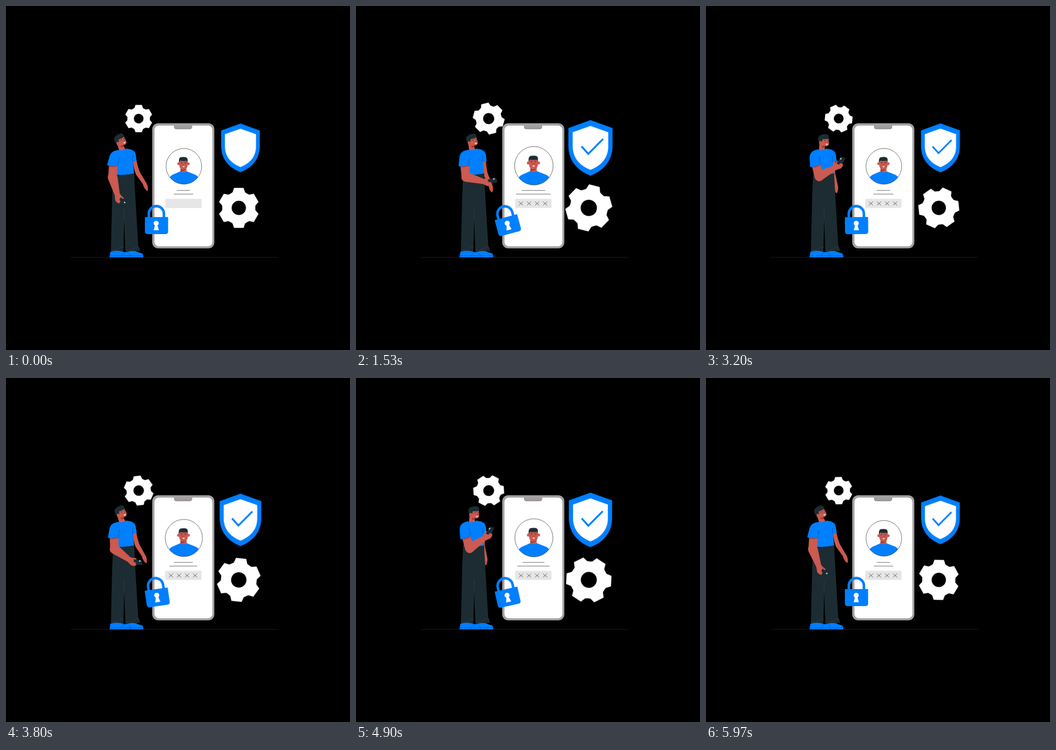
Write an HTML page without scripts that moves like this. It is 748 by 748 pixels and loops after 6010 ms.

```html
<!DOCTYPE html>
<html lang="en">
<head>
<meta charset="utf-8">
<title>Secure login</title>
<style>
  html, body { margin: 0; width: 100%; height: 100%; overflow: hidden; background: #000; }
  svg { display: block; width: 100vw; height: 100vh; }

  :root {
    --loop: 6010ms;
    --beat: calc(var(--loop) / 4);
    --step: calc(var(--loop) / 6);
    --sine: cubic-bezier(.37, 0, .63, 1);
    --in: cubic-bezier(.42, 0, .75, .57);
    --out: cubic-bezier(.25, .49, .6, 1);
  }

  .blue { fill: #007fff; }
  .skin { fill: #cb5a50; }
  .shade { fill: #a53d3a; }
  .dark { fill: #1c2c32; }
  .white { fill: #fff; }
  .fold { fill: none; stroke: #0a4a90; stroke-width: .8; stroke-linecap: round; }
  .seam { fill: none; stroke: #3d4b50; stroke-width: .6; }
  .ink { fill: none; stroke: #1c2c32; stroke-width: .9; stroke-linecap: round; }

  /* slow pulse */
  .pulse, .swing, .avatar, .stretch { animation: pulse var(--beat) var(--sine) infinite alternate; }
  .swing { animation-name: swing; transform-origin: 327px 464px; }
  .avatar { animation-name: grow; transform-origin: 386.5px 365px; }
  .stretch { animation-name: stretch; }
  @keyframes pulse { to { transform: scale(1.143); } }
  @keyframes swing { to { transform: rotate(-15deg); } }
  @keyframes grow { to { transform: scale(1.08); } }
  @keyframes stretch { to { transform: scaleX(1.8); } }

  .spin { animation: spin var(--loop) linear infinite; }
  .back { animation-direction: reverse; }
  @keyframes spin { to { transform: rotate(180deg); } }

  /* figure */
  .head, .far { animation: nod var(--step) var(--sine) infinite alternate; }
  .head { transform-origin: 251px 312px; }
  .far { animation-name: far; transform-origin: 279px 330px; }
  @keyframes nod { from { transform: rotate(-22deg); } to { transform: rotate(2deg); } }
  @keyframes far { to { transform: rotate(20deg); } }

  .upper, .fore { animation: upper var(--step) linear infinite alternate; }
  .upper { transform-origin: 236px 328px; }
  .fore { animation-name: fore; }
  @keyframes upper {
    0% { transform: rotate(6.5deg); animation-timing-function: var(--in); }
    40% { transform: rotate(0deg); }
    47% { transform: rotate(-3deg); }
    63% { transform: rotate(-6deg); }
    80% { transform: rotate(-12deg); animation-timing-function: var(--out); }
    100% { transform: rotate(-14deg); }
  }
  @keyframes fore {
    0% { transform: rotate(67.5deg); animation-timing-function: var(--in); }
    40% { transform: rotate(26deg); }
    47% { transform: rotate(17deg); }
    63% { transform: rotate(-2deg); }
    80% { transform: rotate(-17deg); animation-timing-function: var(--out); }
    100% { transform: rotate(-22deg); }
  }

  /* password marks and tick */
  .mark { fill: none; stroke: #444; stroke-width: .9; opacity: 0; animation: var(--loop) step-end infinite; }
  .m1 { animation-name: m1; }
  .m2 { animation-name: m2; }
  .m3 { animation-name: m3; }
  .m4 { animation-name: m4; }
  @keyframes m1 { 5% { opacity: 1; } 100% { opacity: 1; } }
  @keyframes m2 { 9% { opacity: 1; } 100% { opacity: 1; } }
  @keyframes m3 { 13% { opacity: 1; } 100% { opacity: 1; } }
  @keyframes m4 { 17% { opacity: 1; } 100% { opacity: 1; } }
  .tick {
    fill: none; stroke: #007fff; stroke-width: 3.6;
    stroke-dasharray: 1 2; animation: tick var(--loop) infinite;
  }
  @keyframes tick {
    0%, 12% { stroke-dashoffset: 1.05; }
    22%, 100% { stroke-dashoffset: 0; }
  }
</style>
</head>
<body>
<svg viewBox="0 0 748 748">
  <defs>
    <path id="tooth" d="M-10.3-43.6H10.3L13.6-34 19-30V0H-19V-30L-13.6-34Z"/>
    <g id="gear">
      <g class="white">
        <circle r="35.8"/>
        <use href="#tooth"/>
        <use href="#tooth" transform="rotate(60)"/>
        <use href="#tooth" transform="rotate(120)"/>
        <use href="#tooth" transform="rotate(180)"/>
        <use href="#tooth" transform="rotate(240)"/>
        <use href="#tooth" transform="rotate(300)"/>
      </g>
      <circle r="15.5"/>
    </g>
    <path id="cross" d="M-4.7-4.2 4.7 4.2M4.7-4.2-4.7 4.2"/>
    <clipPath id="round"><circle cx="386.7" cy="348.6" r="38.8"/></clipPath>
    <linearGradient id="notch" x2="0" y2="1">
      <stop stop-color="#a6a3a4"/>
      <stop offset="1" stop-color="#989697"/>
    </linearGradient>
  </defs>

  <rect width="748" height="748"/>
  <path d="M141 546.6H592" stroke="#1d2224" stroke-width=".9"/>

  <!-- gears -->
  <g transform="translate(288.5 244.8) scale(.68)"><g class="pulse"><g class="spin"><use href="#gear"/></g></g></g>
  <g transform="translate(506.2 439)"><g class="pulse"><g class="spin back"><use href="#gear"/></g></g></g>

  <!-- shield -->
  <g transform="translate(509.8 308.3)">
    <g class="pulse">
      <path class="blue" d="M0-52.8 42-37.5V-4C42 28 21 45 0 53-21 45-42 28-42-4V-37.5Z"/>
      <path class="white" d="M0-41.6 33.8-29.5V-3C33.8 22 17 35 0 42-17 35-33.8 22-33.8-3V-29.5Z"/>
      <path class="tick" pathLength="1" d="M-17-2.8-4.2 11.6 24-16.8"/>
    </g>
  </g>

  <!-- phone -->
  <rect x="318" y="255" width="135" height="272" rx="13" fill="#a3a0a1"/>
  <rect class="white" x="322.8" y="260" width="126" height="262.6" rx="9.5"/>
  <path d="M365 259.5H405V262Q405 268 399 268H371Q365 268 365 262Z" fill="url(#notch)"/>

  <g class="avatar">
    <circle class="white" cx="386.7" cy="348.6" r="38.8"/>
    <g clip-path="url(#round)">
      <path class="blue" d="M350 392Q352 372 362 367L379 359.5Q386 362 393 359.5L412 367Q422 372 424 392Z"/>
    </g>
    <circle class="skin" cx="375.6" cy="343" r="3"/>
    <circle class="skin" cx="396.2" cy="343" r="3"/>
    <path class="skin" d="M379.5 350H392.5V360Q386 363 379.5 360Z"/>
    <path class="shade" d="M379.5 354.5Q386 357 391.5 354.5 387 359.5 379.5 360Z"/>
    <path class="skin" d="M377 334H394.7V348Q393.5 355.5 386 355.5 378 355 377 348Z"/>
    <path class="dark" d="M376.2 341Q374.8 328.5 382 328.6 395.5 326.5 394.9 335V341L393.4 336.5Q386 337.5 378.6 336.3Z"/>
    <path class="ink" d="M380 340.2 383.4 339.6M388.2 339.6 391.6 340.2"/>
    <path class="ink" d="M381.8 342.6V343.2M389.8 342.6V343.2"/>
    <path class="shade" d="M385.2 342.5 384.2 346.2H386.4Z"/>
    <path class="white" d="M383.8 348.4H388.6Q387.8 350.6 386.2 350.6 384.4 350.4 383.8 348.4Z"/>
    <circle cx="386.7" cy="348.6" r="38.8" fill="none" stroke="#333" stroke-width=".8"/>
  </g>

  <g fill="#555">
    <g transform="translate(385.8 401)"><rect class="stretch" x="-14.2" y="-.5" width="28.4" height="1"/></g>
    <g transform="translate(385.8 409)"><rect class="stretch" x="-21" y="-.5" width="42" height="1"/></g>
  </g>
  <rect x="346" y="419.3" width="79.3" height="20" rx="3" fill="#e6e6e6"/>
  <use href="#cross" class="mark m1" x="358.7" y="429.4"/>
  <use href="#cross" class="mark m2" x="376.2" y="429.4"/>
  <use href="#cross" class="mark m3" x="393.7" y="429.4"/>
  <use href="#cross" class="mark m4" x="411.2" y="429.4"/>

  <!-- padlock -->
  <g class="swing">
    <path d="M310.6 461V451.5A16.4 16.4 0 0 1 343.4 451.5V461" fill="none" stroke="#007fff" stroke-width="5.6"/>
    <path class="blue" d="M303 459H351.5Q352.5 459 352.5 460V490Q352.5 496 346.5 496H308Q302 496 302 490V460Q302 459 303 459Z"/>
    <circle class="white" cx="326.6" cy="472.4" r="5.5"/>
    <path class="white" d="M324.8 474H328.6L332.4 487.6H321Z"/>
  </g>

  <!-- man -->
  <g class="far">
    <path class="skin" d="M275 330 283.5 334Q286 350 291.5 362L304 383Q309 390 308.6 400 307.5 403 305 400.5 299.5 395.5 297.5 387L283 367Q277 354 275 330Z"/>
    <path d="M302 391Q305 394 305.5 399" fill="none" stroke="#a53d3a" stroke-width=".6"/>
  </g>

  <path class="dark" d="M233 364Q256 368 278.5 363L281 410 287.5 520 291.5 532 262 538 259.5 533 257 466 255 536H228L231 410Z"/>
  <path class="blue" d="M227 534.5Q238 531 249 533 258 536 263 535 272 531.5 282 533.5 291 536.5 296 538 299 541 298.5 546.5H225Z"/>
  <path class="fold" d="M226 543H270M271 543H298M250 545Q252 538 257 536M271 546Q270 539 266 537"/>
  <path class="seam" d="M229 530Q241 533 248 525 255 521 258 528M262 530Q271 533 279 526 287 520 290 528M257 440V466"/>

  <g class="head">
    <path class="skin" d="M247 296 257 303 259.5 314Q253 317 245.5 314Z"/>
    <path class="shade" d="M251.5 303 259.5 305Q256.5 309.5 252.5 308Z"/>
    <path class="skin" d="M250 287H266.5L267.6 299Q267 305 261 305 253.5 304.4 250.5 299Z"/>
    <path class="dark" d="M245 295Q241.5 284 249 281 255 277.5 264.5 279.6 268.4 283 266.8 288.4 260 290.4 253.4 289.6L252.6 295 248.6 298Z"/>
    <ellipse class="skin" cx="249.2" cy="297.5" rx="3.4" ry="4"/>
    <path d="M248 296Q250.4 296.5 250 299.5" fill="none" stroke="#a53d3a" stroke-width=".7"/>
    <path class="ink" d="M256.8 293 260.2 292M264 291.8 266.4 292.4M259.4 295.2V295.8M265.2 295V295.6"/>
    <path class="shade" d="M263.6 294 265.4 298 262.8 298.2Z"/>
    <path class="white" d="M260.2 300 265 299.5Q264.6 302 262.8 302 261 301.8 260.2 300Z"/>
  </g>

  <path class="blue" d="M244 313Q252 315.5 262 310L272 312Q281 315 282.3 324L284 336.5Q280 339.5 276 339L278.5 364Q256 369 234 366 237 350 235 338L228 322Q232 315 244 313Z"/>
  <path class="fold" d="M276 339Q275 332 275.5 326M236 362Q240 361 242 357"/>

  <g class="upper">
    <g transform="translate(236 372)">
      <g class="fore">
        <path class="skin" d="M-9 0C-9 7-4 10 2 10L42 5.5 46-6 40-5.5 4-11C-4-11-9-6-9 0Z"/>
        <path class="skin" d="M39-5.5Q45-7 50-11 53-12 52-8L57-4Q60 2 55 6 47 8 39 5.5Z"/>
        <g transform="translate(58.5 -6) rotate(-30)">
          <path class="dark" d="M-8-5.5H6.5Q8-5.5 8.6-4L10.5 4Q10.6 5.6 9 5.6H-5.5Q-7 5.6-7.6 4L-9.3-4Q-9.5-5.5-8-5.5Z"/>
          <rect class="white" x="2.5" y="-3.8" width="3.6" height="2" rx=".8"/>
        </g>
        <path class="skin" d="M46 0 56-2.5Q58-2 57-.5L59.5 1Q60 2.5 58 3.2L56.5 5.5 50 8 43 5.5Z"/>
      </g>
    </g>
    <path class="skin" d="M226 343 227 368Q228 381 237 382 246 381 246 370L244.5 343Z"/>
    <path class="shade" d="M225 346H245L244.5 348Q236 351.5 225.5 350Z"/>
    <path class="blue" d="M248 314C234 312.5 227 318.5 225 328L222 347.5Q233 350.5 245 346L248 330Z"/>
    <path class="fold" d="M245 346Q244.5 336 247 329"/>
  </g>
</svg>
</body>
</html>
```
